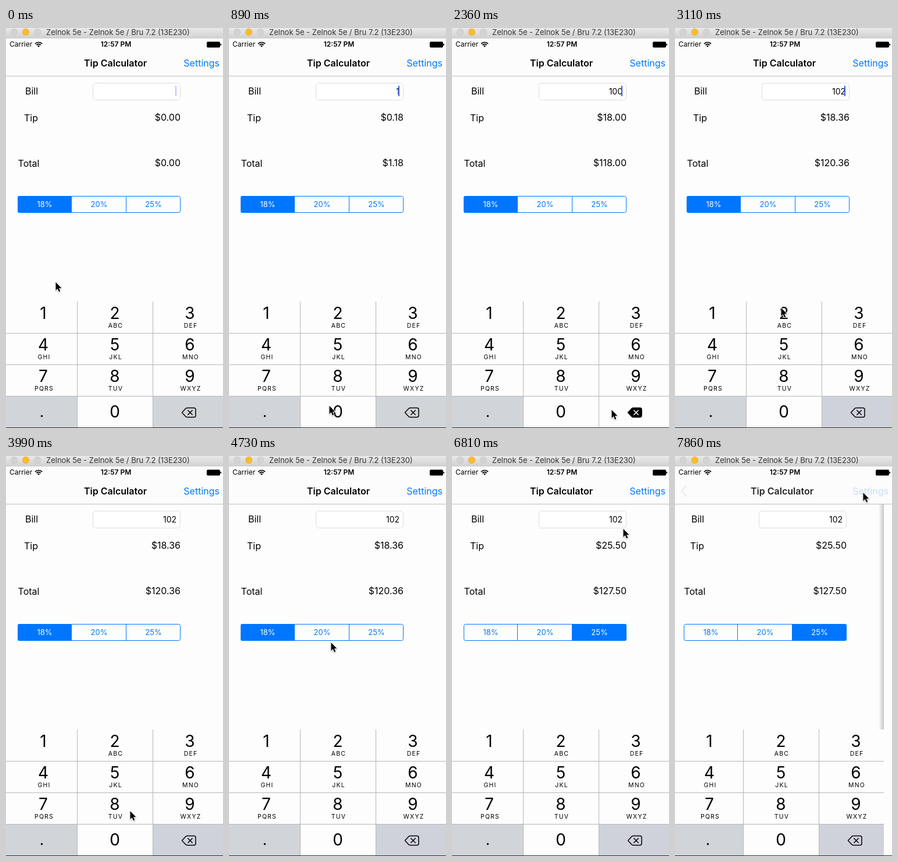
These frames come from a looping animation (373x686 px, 8000 ms). An HTML page with a canvas:

```html
<!DOCTYPE html>
<html lang="en">
<head>
<meta charset="utf-8">
<title>Tip Calculator</title>
<style>
html, body { margin: 0; width: 100%; height: 100%; overflow: hidden; background: #fdfdfd; }
canvas { display: block; width: 373px; height: 686px; }
</style>
</head>
<body>
<canvas id="stage"></canvas>
<script>
const W = 373, H = 686, LOOP = 8000, TICK = 148;
const BLUE = '#0076ff', KEY_GREY = '#d1d4d9', PAPER = '#fdfdfd';
const canvas = document.getElementById('stage');
const ctx = canvas.getContext('2d');
const ratio = window.devicePixelRatio || 1;
canvas.width = W * ratio;
canvas.height = H * ratio;

// Pointer path: [tick, x, y]
const path = [
  [0, 85, 436], [1, 60, 500], [3, 60, 500], [4, 78, 535], [5, 135, 610], [6, 172, 648],
  [11, 172, 648], [12, 200, 650], [13, 245, 653], [14, 274, 655], [17, 274, 655],
  [18, 252, 610], [19, 200, 515], [20, 182, 480], [21, 182, 480], [22, 190, 530],
  [23, 206, 610], [24, 215, 655], [26, 215, 658], [28, 210, 560], [30, 185, 360],
  [31, 178, 325], [32, 175, 320], [33, 167, 308], [35, 165, 305], [36, 185, 303],
  [38, 229, 299], [41, 229, 299], [42, 232, 295], [44, 258, 220], [46, 294, 125],
  [47, 303, 104], [48, 313, 82], [50, 323, 63], [54, 323, 63]
];

// Value changes: [tick, value]
const bills = [[0, ''], [4, '1'], [7, '10'], [9, '100'], [17, '10'], [21, '102']];
const segments = [[0, 0], [35, 1], [41, 2]];
const presses = [[0, ''], [3, '1'], [4, ''], [7, '0'], [9, ''], [16, 'del'], [18, ''], [20, '2'], [21, '']];
const rates = [18, 20, 25];

const letters = ['', 'ABC', 'DEF', 'GHI', 'JKL', 'MNO', 'PQRS', 'TUV', 'WXYZ'];
const colEdges = [0, 123, 253, 378];
const rowEdges = [469, 524, 578, 632, 685];
const keyX = [64, 187, 316];

const valueAt = (list, tick) => list.filter(item => item[0] <= tick).pop()[1];

function pointerAt(tick) {
  const i = Math.max(1, path.findIndex(p => p[0] >= tick));
  const [t0, x0, y0] = path[i - 1], [t1, x1, y1] = path[i];
  const k = (tick - t0) / (t1 - t0);
  return [Math.round(x0 + (x1 - x0) * k), Math.round(y0 + (y1 - y0) * k)];
}

function caretAlpha(tick) {
  if (tick === 0 || tick === 12) return 0.35;
  if (tick < 3 || tick === 13) return 0;
  if (tick < 21) return 1;
  return (tick * TICK - 3110) % 1000 < 490 ? 1 : 0;
}

function text(str, x, y, size, align = 'left', color = '#000', weight = 400, spacing = 0) {
  ctx.font = `${weight} ${size}px Inter, "Liberation Sans", sans-serif`;
  ctx.letterSpacing = spacing + 'px';
  ctx.textAlign = align;
  ctx.fillStyle = color;
  ctx.fillText(str, x, y);
}

function rect(x, y, w, h, color) {
  ctx.fillStyle = color;
  ctx.fillRect(x, y, w, h);
}

function roundRect(x, y, w, h, r) {
  ctx.beginPath();
  ctx.roundRect(x, y, w, h, r);
}

function disc(x, y, r, color) {
  ctx.fillStyle = color;
  ctx.beginPath();
  ctx.arc(x, y, r, 0, Math.PI * 2);
  ctx.fill();
}

function polyline(points) {
  ctx.beginPath();
  points.forEach(([x, y]) => ctx.lineTo(x, y));
}

function windowButton(x, color, rim) {
  disc(x, 7, 6, rim);
  disc(x, 7, 5.3, color);
}

function drawWindowBar() {
  const shade = ctx.createLinearGradient(0, 0, 0, 18);
  shade.addColorStop(0, '#e9e9e9');
  shade.addColorStop(1, '#d0d0d0');
  rect(0, 0, W, 18, shade);
  windowButton(14, '#d3d3d3', '#c4c4c4');
  windowButton(34, '#fdbc2e', '#e4a52c');
  windowButton(54, '#d3d3d3', '#c4c4c4');
  text('Zelnok 5e - Zelnok 5e / Bru 7.2 (13E230)', 69, 12, 13, 'left', '#333');
}

function drawStatusBar() {
  text('Carrier', 6, 32, 12);
  text('12:57 PM', 189, 32, 12, 'center', '#000', 600);
  ctx.strokeStyle = '#000';
  ctx.lineWidth = 1.7;
  for (const r of [4.8, 8]) {
    ctx.beginPath();
    ctx.arc(56, 32.5, r, -Math.PI * 0.77, -Math.PI * 0.23);
    ctx.stroke();
  }
  ctx.fillStyle = '#000';
  ctx.beginPath();
  ctx.moveTo(56, 33);
  ctx.arc(56, 32.5, 2.6, -Math.PI * 0.77, -Math.PI * 0.23);
  ctx.fill();
  roundRect(345, 23.5, 23, 10, 2);
  ctx.fill();
  rect(368.5, 27, 1.5, 3, '#000');
}

function drawNavBar(tick) {
  const leaving = tick >= 53;
  rect(0, 18, W, 64, '#fcfcfc');
  rect(0, 82, W, 1, '#bdbdbf');
  drawStatusBar();
  text('Tip Calculator', leaving ? 184 : 188, 66, 16, 'center', leaving ? '#262626' : '#000', 600);
  text('Settings', 367, 66, 16, 'right', tick >= 52 ? '#c7dffa' : BLUE);
  if (leaving) {
    ctx.strokeStyle = '#e9eef3';
    ctx.lineWidth = 2.5;
    polyline([[20, 51], [11, 60], [20, 69]]);
    ctx.stroke();
  }
}

function drawForm(tick) {
  const bill = valueAt(bills, tick), selected = valueAt(segments, tick);
  const tip = bill * rates[selected] / 100;
  const money = n => '$' + n.toFixed(2);

  text('Bill', 44, 114, 16, 'center');
  text('Tip', 43, 160, 16, 'center');
  text('Total', 39, 238, 16, 'center');
  text(money(tip), 300, 159, 16, 'right');
  text(money(+bill + tip), 300, 237, 16, 'right');

  roundRect(149.5, 94.5, 150, 29, 5);
  ctx.fillStyle = '#fff';
  ctx.fill();
  ctx.strokeStyle = '#dcdcdc';
  ctx.lineWidth = 1;
  ctx.stroke();
  text(bill, 293, 114, 14, 'right');
  ctx.globalAlpha = caretAlpha(tick);
  rect(291, 99, 2, 18, '#4263e4');
  ctx.globalAlpha = 1;

  const edges = [20, 113, 207, 300];
  ctx.save();
  roundRect(20, 288, 280, 29, 3);
  ctx.clip();
  rect(edges[selected], 288, edges[selected + 1] - edges[selected], 29, BLUE);
  ctx.restore();
  roundRect(20.5, 288.5, 279, 28, 3);
  ctx.strokeStyle = BLUE;
  ctx.stroke();
  rect(112, 288, 1, 29, BLUE);
  rect(206, 288, 1, 29, BLUE);
  rates.forEach((rate, i) =>
    text(rate + '%', 66.5 + i * 93.5, 307, 13, 'center', i === selected ? '#fff' : BLUE));
}

function drawDeleteIcon(pressed) {
  ctx.lineJoin = ctx.lineCap = 'round';
  ctx.lineWidth = 1.5;
  ctx.strokeStyle = ctx.fillStyle = '#000';
  ctx.beginPath();
  ctx.moveTo(302.5, 659.5);
  ctx.lineTo(309, 652.5);
  ctx.quadraticCurveTo(310, 651.5, 312, 651.5);
  ctx.arcTo(326, 651.5, 326, 656, 3);
  ctx.arcTo(326, 667.5, 320, 667.5, 3);
  ctx.lineTo(312, 667.5);
  ctx.quadraticCurveTo(310, 667.5, 309, 666.5);
  ctx.closePath();
  if (pressed) ctx.fill();
  ctx.stroke();
  ctx.strokeStyle = pressed ? '#fff' : '#000';
  for (const d of [-3.7, 3.7]) {
    polyline([[316.5 - d, 655.8], [316.5 + d, 663.2]]);
    ctx.stroke();
  }
}

function drawKeypad(tick) {
  const pressed = valueAt(presses, tick);
  const fillKey = (col, row, color) => rect(colEdges[col], rowEdges[row],
    colEdges[col + 1] - colEdges[col], rowEdges[row + 1] - rowEdges[row], color);

  rect(0, 469, 378, 216, PAPER);
  fillKey(0, 3, KEY_GREY);
  if (pressed !== 'del') fillKey(2, 3, tick < 16 ? KEY_GREY : '#d0d2db');
  if (pressed === '0') fillKey(1, 3, KEY_GREY);
  else if (pressed && pressed !== 'del') fillKey(pressed - 1, 0, KEY_GREY);

  for (const y of [523, 577, 631]) rect(0, y, 378, 1, '#b5b6b9');
  for (const x of [122, 252]) rect(x, 469, 1, 216, '#b5b6b9');

  letters.forEach((label, i) => {
    const x = keyX[i % 3], y = 499 + Math.floor(i / 3) * 54;
    text(i + 1, x, y, 28, 'center');
    text(label, x + 1.5, y + 15, 10.5, 'center', '#000', 400, 1.2);
  });
  text('0', 187, 668, 28, 'center');
  disc(61.5, 665.5, 1.7, '#000');
  drawDeleteIcon(pressed === 'del');
}

function drawIncomingPage() {
  const shadow = ctx.createLinearGradient(350, 0, 359, 0);
  shadow.addColorStop(0, 'rgba(0,0,0,0)');
  shadow.addColorStop(1, 'rgba(0,0,0,0.22)');
  rect(350, 83, 9, 386, shadow);
  rect(359, 83, 14, 602, PAPER);
}

function drawPointer([x, y]) {
  ctx.save();
  ctx.translate(x, y);
  polyline([[0.5, 0], [0.5, 14], [3.7, 11], [6, 16.3], [8.3, 15.3], [6, 10.3], [10.3, 10]]);
  ctx.closePath();
  ctx.shadowColor = 'rgba(0,0,0,0.3)';
  ctx.shadowBlur = 2;
  ctx.shadowOffsetY = 1;
  ctx.lineJoin = 'round';
  ctx.lineWidth = 1.8;
  ctx.strokeStyle = '#fff';
  ctx.stroke();
  ctx.shadowColor = 'transparent';
  ctx.fillStyle = '#000';
  ctx.fill();
  ctx.restore();
}

function draw(now) {
  const tick = Math.min(53, Math.floor((now % LOOP + 10) / TICK));
  const leaving = tick >= 53;
  ctx.setTransform(ratio, 0, 0, ratio, 0, 0);
  rect(0, 0, W, H, PAPER);
  ctx.save();
  if (leaving) ctx.translate(-5, 0);
  drawForm(tick);
  drawKeypad(tick);
  ctx.restore();
  if (leaving) drawIncomingPage();
  rect(0, 685, W, 1, '#2b2b2b');
  drawNavBar(tick);
  drawWindowBar();
  drawPointer(pointerAt(tick));
}

const start = performance.now();
function loop() {
  draw(performance.now() - start);
  requestAnimationFrame(loop);
}
loop();
</script>
</body>
</html>
```
